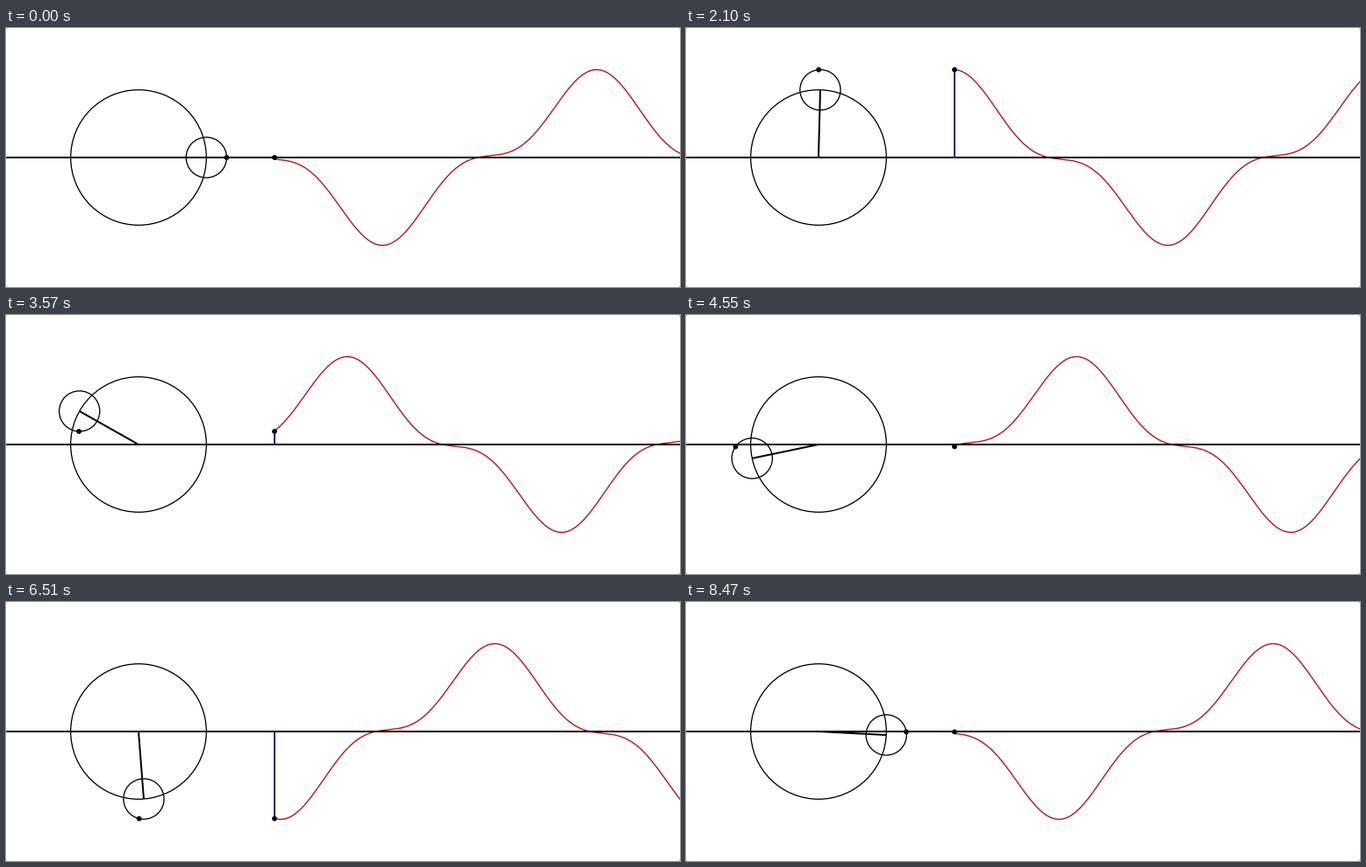
A matplotlib script that plays this animation: 768 by 296 pixels, repeating every 8.54 s.

```python
import numpy as np
import matplotlib.pyplot as plt
from matplotlib.animation import FuncAnimation
from matplotlib.patches import Circle

W, H, DPI = 768, 296, 100
FRAMES, INTERVAL = 122, 70
PX = 72 / DPI  # points per pixel

CX, CY = 151, 148
R, r = 77.3, 23.1
X0 = 306        # left end of the wave
SPEED = 4       # wave travel, pixels per frame
STEP = 2 * np.pi / FRAMES
LAG = np.radians(4.5)

fig = plt.figure(figsize=(W / DPI, H / DPI), dpi=DPI, facecolor="white")
ax = fig.add_axes([0, 0, 1, 1])
ax.set_xlim(0, W)
ax.set_ylim(H, 0)
ax.axis("off")


def line(color, width, z, **kw):
    return ax.plot([], [], color=color, lw=width * PX, zorder=z,
                   solid_capstyle="butt", **kw)[0]


def ring(radius):
    return ax.add_patch(Circle((CX, CY), radius, fill=False, ec="black",
                               lw=1.3 * PX, zorder=4))


def dot():
    return ax.add_patch(Circle((X0, CY), 2.9, fc="black", lw=0, zorder=6))


# Softened stage corners
ax.scatter([0, W, 0, W], [0, 0, H, H], s=(2 * PX) ** 2, marker="s",
           color="#a0a0a0", lw=0)

wave = line("#b01216", 1.35, 2)
stem = line("#001f80", 2, 3)
axis = line("black", 2, 4)
axis.set_data([0, W], [CY, CY])
arm = line("black", 2, 5)
ring(R)
small = ring(r)
tip, head = dot(), dot()

xs = np.arange(X0, W + 3)


def height(t, lag=0.0):
    return R * np.sin(t) - r * np.sin(3 * t + lag)


def update(i):
    a = i * STEP
    x, y = CX + R * np.cos(a), CY - R * np.sin(a)
    tip_y = CY - height(a)
    small.center = (x, y)
    arm.set_data([CX, x], [CY, y])
    tip.center = (x + r * np.cos(3 * a), tip_y)
    head.center = (X0, tip_y)
    stem.set_data([X0, X0], [CY, tip_y])
    past = a - (xs - X0 + 0.5) / SPEED * STEP
    wave.set_data(xs, CY - height(past, LAG))
    return wave, stem, arm, small, tip, head


anim = FuncAnimation(fig, update, frames=FRAMES, interval=INTERVAL,
                     repeat=True, repeat_delay=0)
plt.show()
```
